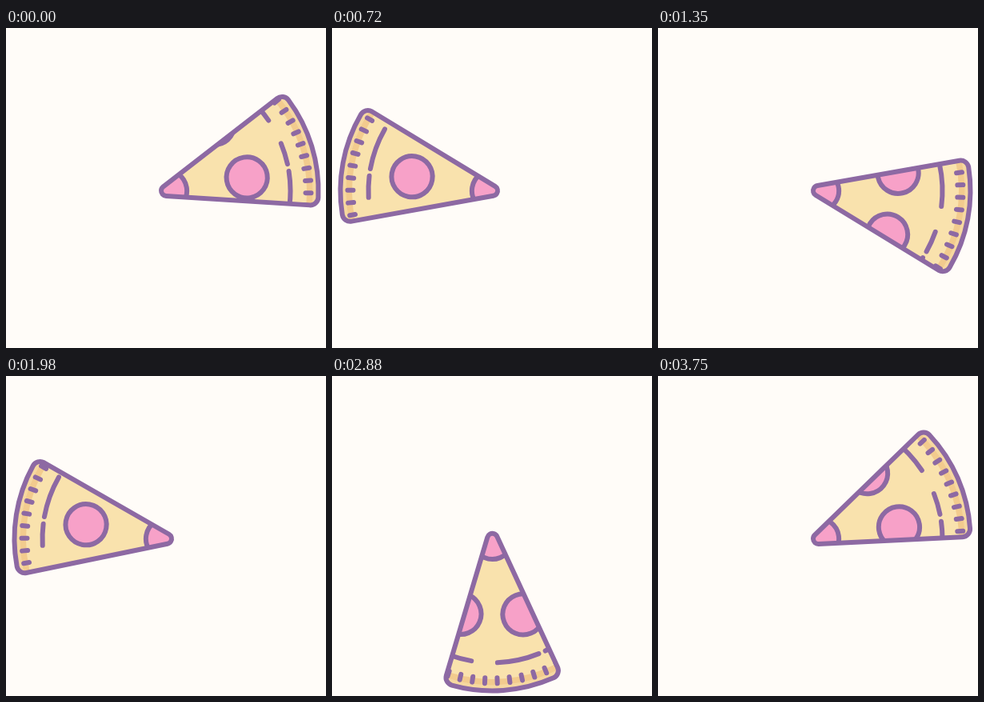
These frames come from a looping animation (400x400 px, 3780 ms). An HTML page with a canvas:

```html
<!DOCTYPE html>
<html lang="en">
<head>
<meta charset="utf-8">
<title>Turning pizza slice</title>
<style>
  html, body { margin: 0; width: 100%; height: 100%; overflow: hidden; background: #fffcf8; }
  canvas { display: block; }
</style>
</head>
<body>
<canvas id="stage" width="400" height="400"></canvas>
<script>
const ctx = document.getElementById('stage').getContext('2d');
const RAD = Math.PI / 180;
const STEP_MS = 30, STEPS = 126, STEPS_PER_TURN = 42;
const HALF_ANGLE = 20.7 * RAD, TIP_R = 6.5, CORNER_R = 10, OUTER_R = 190;
const CORNER_DIST = OUTER_R - CORNER_R;
const CORNER_ANGLE = HALF_ANGLE - Math.asin((CORNER_R - TIP_R) / CORNER_DIST);
const COLORS = {
  background: '#fffcf8', line: '#8d69a3', cheese: '#f9e2ad',
  crust: '#f6d8a0', shade: '#f2cb8e', sausage: '#f7a1c8'
};

function slicePath(angle) {
  const quarter = Math.PI / 2;
  const from = angle - HALF_ANGLE, to = angle + HALF_ANGLE;
  const first = angle - CORNER_ANGLE, last = angle + CORNER_ANGLE;
  const corner = (a, start, end) =>
    ctx.arc(CORNER_DIST * Math.cos(a), CORNER_DIST * Math.sin(a), CORNER_R, start, end);
  ctx.beginPath();
  ctx.arc(0, 0, TIP_R, to + quarter, from + 3 * quarter);
  corner(first, from - quarter, first);
  ctx.arc(0, 0, OUTER_R, first, last);
  corner(last, last, to + quarter);
  ctx.closePath();
}

function disc(x, y, r, fill, outlined) {
  ctx.beginPath();
  ctx.arc(x, y, r, 0, 2 * Math.PI);
  ctx.fillStyle = fill;
  ctx.fill();
  if (outlined) ctx.stroke();
}

function arcLine(r, from, to) {
  ctx.beginPath();
  ctx.arc(0, 0, r, from * RAD, to * RAD);
  ctx.stroke();
}

function drawPizza(angle) {
  ctx.save();
  ctx.rotate(angle);
  disc(0, 0, 200, COLORS.crust);
  disc(0, 0, 183, COLORS.shade);
  disc(0, 0, 175.5, COLORS.cheese);
  disc(0, 0, 25.6, COLORS.sausage, true);
  for (let i = 0; i < 72; i++) {
    if (i % 9 === 0) {
      disc(102, 0, 25.6, COLORS.sausage, true);
      arcLine(155, -13.1, -3.1);
      arcLine(155, 0.2, 19.8);
    }
    ctx.beginPath();
    ctx.moveTo(174, 0.6);
    ctx.lineTo(181, 0.6);
    ctx.stroke();
    ctx.rotate(5 * RAD);
  }
  ctx.restore();
}

function draw(time) {
  const step = Math.floor(time / STEP_MS) % STEPS;
  const turn = step / STEPS_PER_TURN;
  const drift = 1.3 * Math.cos(2 * Math.PI * (step - 36) / 95);
  const sliceAngle = (360 * turn - 16.1 + drift) * RAD;
  const pizzaAngle = (-45 * turn - 9.3) * RAD;

  ctx.setTransform(1, 0, 0, 1, 0, 0);
  ctx.fillStyle = COLORS.background;
  ctx.fillRect(0, 0, 400, 400);
  ctx.translate(200.5, 203.4);
  ctx.strokeStyle = COLORS.line;
  ctx.lineWidth = 6;
  ctx.lineCap = ctx.lineJoin = 'round';

  ctx.save();
  slicePath(sliceAngle);
  ctx.clip();
  drawPizza(pizzaAngle);
  ctx.restore();
  slicePath(sliceAngle);
  ctx.stroke();
}

function tick() {
  draw(performance.now());
  requestAnimationFrame(tick);
}
tick();
</script>
</body>
</html>
```
